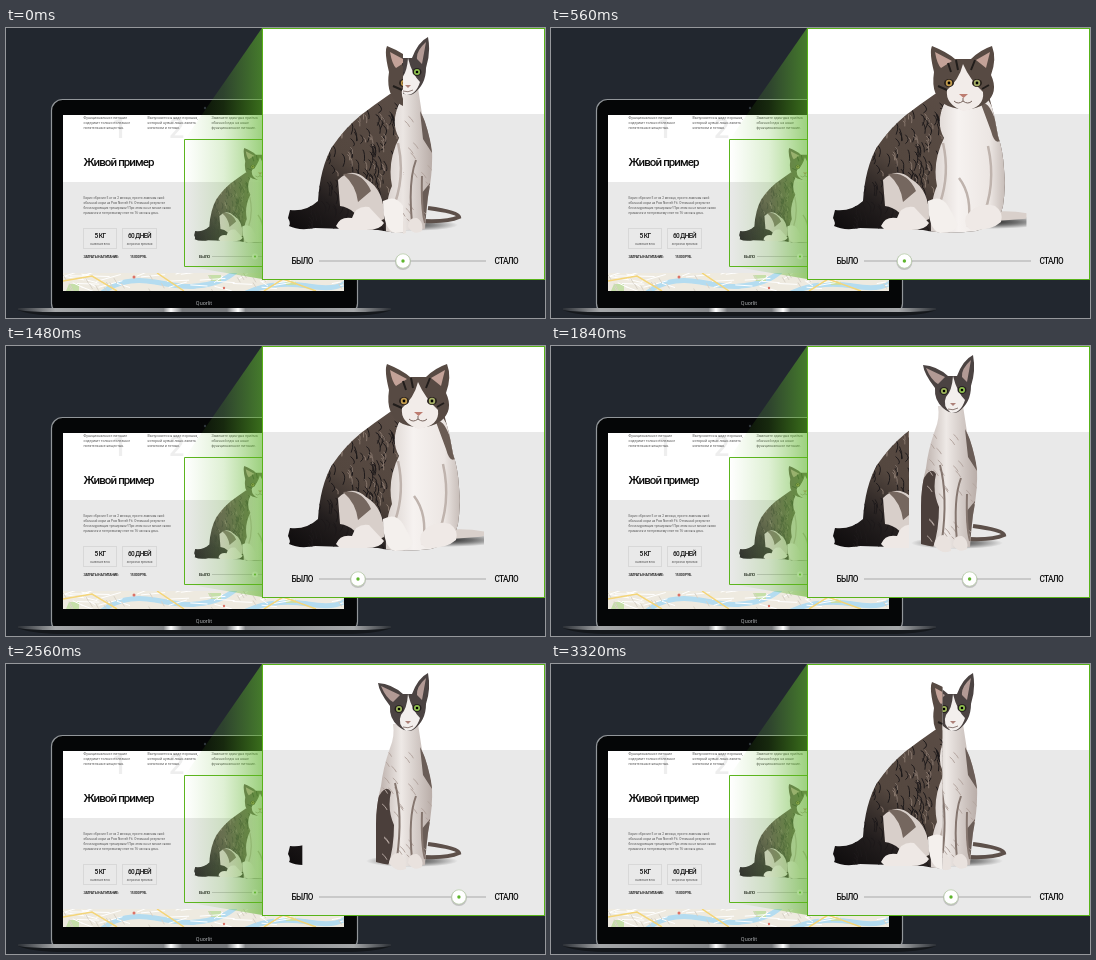
An HTML page for the animation above (3.36 s loop, 539x290 px).

```html
<!DOCTYPE html>
<html lang="ru">
<head>
<meta charset="utf-8">
<style>
  html, body { margin: 0; width: 100%; height: 100%; overflow: hidden; background: #22272f; }
  svg { display: block; width: 539px; height: 290px; }
  text { font-family: Roboto, "Liberation Sans", sans-serif; fill: #111; }
  .bold { font-weight: 500; letter-spacing: -.08em; }
  .tiny { fill: #555; }
</style>
</head>
<body>
<svg viewBox="0 0 539 290">
  <defs>
    <linearGradient id="beam"><stop offset="0" stop-color="#5fb52b" stop-opacity="0"/><stop offset=".5" stop-color="#5fb52b" stop-opacity=".2"/><stop offset="1" stop-color="#5cb22a" stop-opacity=".6"/></linearGradient>
    <linearGradient id="metal"><stop offset="0" stop-color="#2c3036"/><stop offset=".1" stop-color="#a5a7a9"/><stop offset=".39" stop-color="#85878a"/><stop offset=".41" stop-color="#fff"/><stop offset=".44" stop-color="#77797c"/><stop offset=".56" stop-color="#77797c"/><stop offset=".59" stop-color="#fff"/><stop offset=".61" stop-color="#85878a"/><stop offset=".9" stop-color="#a5a7a9"/><stop offset="1" stop-color="#2c3036"/></linearGradient>
    <linearGradient id="coat" x1="0" x2=".8" y1="1" y2="0"><stop offset="0" stop-color="#0c0a0b"/><stop offset=".25" stop-color="#231e1e"/><stop offset=".5" stop-color="#54473f"/><stop offset="1" stop-color="#5b4d46"/></linearGradient>
    <linearGradient id="bib"><stop offset="0" stop-color="#d9d1cd"/><stop offset=".35" stop-color="#f6f2f0"/><stop offset=".75" stop-color="#ece6e3"/><stop offset="1" stop-color="#bdb2ad"/></linearGradient>
    <linearGradient id="skin"><stop offset="0" stop-color="#b5a8a3"/><stop offset=".45" stop-color="#eee9e6"/><stop offset="1" stop-color="#b9ada8"/></linearGradient>
    <radialGradient id="shade"><stop offset="0" stop-color="#000" stop-opacity=".9"/><stop offset=".5" stop-color="#111" stop-opacity=".55"/><stop offset="1" stop-color="#111" stop-opacity="0"/></radialGradient>
    <path id="fatBody" d="M384 66Q368 77 355 87Q339 100 326 119Q314 140 312 173Q300 184 284 182L282 190Q285 195 283 198Q293 203 309 200L372 202Q395 207 425 203Q448 197 452 178Q455 158 453 141Q452 122 447 108Q444 88 438 68Z"/>
    <path id="slimBody" d="M387 60Q389 72 384 84Q377 104 375 122Q370 141 370 160V198Q391 204 419 201Q420 184 422 169Q427 143 426 122Q422 100 416 86L412 60Z"/>
    <clipPath id="fatFur"><use href="#fatBody"/></clipPath>
    <clipPath id="slimFur"><use href="#slimBody"/></clipPath>
    <clipPath id="before"><rect id="beforeBox" x="257" y="1" height="250"/></clipPath>
    <clipPath id="after"><rect id="afterBox" y="1" height="250"/></clipPath>
    <clipPath id="thumb"><rect x="179" y="111" width="77" height="127"/></clipPath>
    <clipPath id="mapArea"><rect x="57" y="245" width="281" height="18"/></clipPath>

    <g id="fat">
      <ellipse cx="435" cy="194" rx="64" ry="7" fill="url(#shade)"/>
      <path d="M438 184Q462 182 480 186Q481 190 472 191L430 194Z" fill="#d9d0cb"/>
      <use href="#fatBody" fill="url(#coat)"/>
      <g clip-path="url(#fatFur)">
        <g id="stripes"/>
        <path d="M394 74Q384 94 393 110Q381 134 386 158Q379 172 380 205H458V108L436 70Z" fill="url(#bib)"/>
        <path d="M430 76Q440 70 450 112Q444 118 440 103Z" fill="#6a5c54"/>
        <path d="M392 115Q399 146 389 175M437 118Q446 158 430 193M408 150Q422 168 417 199" fill="none" stroke="#bfb3ad" stroke-width="2.500"/>
        <path d="M332 152Q346 138 360 151Q379 162 378 191L358 200Q350 180 334 178Z" fill="#d8cfca"/>
        <path d="M337 146Q356 143 365 163L352 174Q350 157 337 146Z" fill="#75675f"/>
      </g>
      <path d="M330 198Q334 188 346 190Q350 177 363 179L378 195Q374 203 356 202L334 202Z" fill="#eee8e5"/>
      <path d="M377 173Q390 166 397 178L407 196Q405 205 389 205Q377 202 377 173Z" fill="#f4f0ed"/>
      <path d="M415 188Q427 173 444 178Q453 184 450 194Q440 203 420 202Q412 198 415 188Z" fill="#efe9e6"/>
      <path d="M383 44Q378 24 381 18Q396 24 404 31H420Q429 22 441 18Q446 31 440 47Q448 64 435 75Q419 86 397 78Q379 70 383 44Z" fill="#574a43"/>
      <path d="M384 24Q386 36 390 40L401 33ZM439 24L425 32L435 40Z" fill="#c3a298"/>
      <path d="M412 36Q408 52 396 62Q394 76 412 83Q434 80 432 64Q419 52 412 36Z" fill="#f2ece9"/>
      <path d="M397 35L400 44M405 32L407 42M424 32L420 42M387 58L396 62M438 57L431 61" stroke="#211d1b" stroke-width="2"/>
      <ellipse cx="398" cy="55" rx="5" ry="4" fill="#28211c"/><ellipse cx="426" cy="55" rx="5" ry="4" fill="#28211c"/>
      <circle cx="398" cy="55" r="3.200" fill="#c29b4d"/><circle cx="426" cy="55" r="3.200" fill="#a5ae66"/>
      <circle cx="398" cy="55" r="1.400"/><circle cx="426" cy="55" r="1.400"/>
      <path d="M408 66H417L412.500 70Z" fill="#bd7c70"/>
      <path d="M412 70V73Q407 77 403 73M412 73Q417 77 421 73" fill="none" stroke="#76635c"/>
    </g>

    <g id="slim">
      <ellipse cx="406" cy="197" rx="46" ry="6" fill="url(#shade)" opacity=".8"/>
      <path d="M422 180Q452 184 453 189Q442 194 418 193" fill="none" stroke="#5d504a" stroke-width="4"/>
      <use href="#slimBody" fill="url(#skin)"/>
      <g clip-path="url(#slimFur)">
        <path d="M366 147Q378 116 385 128Q381 145 388 161Q388 184 382 202H367Z" fill="#4b3f3b"/>
        <path d="M414 83Q424 99 426 125L417 111ZM415 166L424 155V197Q416 191 415 166Z" fill="#6a5d57"/>
        <g id="wrinkles"/>
        <path d="M389 119Q397 150 391 194M410 132Q402 153 406 195M416 148Q415 181 419 195" fill="none" stroke="#85766f" stroke-width="2"/>
      </g>
      <path d="M383 199Q385 189 392 189Q400 191 400 205Q390 209 383 199ZM402 199Q402 189 411 190Q418 194 416 203Q408 208 402 199Z" fill="#e9e2de"/>
      <path d="M384 42Q373 28 372 19Q386 20 397 30H406Q412 14 422 9Q425 25 420 40Q420 57 407 66Q400 69 392 62Q383 54 384 42Z" fill="#4b4342"/>
      <path d="M375 22Q380 34 387 38L394 31ZM420 14Q410 23 411 31L416 36Z" fill="#b29a95"/>
      <path d="M402 30Q401 45 395 51Q391 60 400 67Q410 67 414 54Q406 46 402 30Z" fill="#f3efed"/>
      <ellipse cx="393" cy="45" rx="4.500" ry="4" fill="#25201f"/><ellipse cx="411" cy="44" rx="4.500" ry="4" fill="#25201f"/>
      <circle cx="393" cy="45" r="3" fill="#9eb55b"/><circle cx="411" cy="44" r="3" fill="#8fc04f"/>
      <circle cx="393" cy="45" r="1.300"/><circle cx="411" cy="44" r="1.300"/>
      <path d="M399 57H405L402 60Z" fill="#ad8179"/>
      <path d="M397 63Q402 65 407 62" fill="none" stroke="#8f7d78"/>
    </g>
  </defs>

  <rect width="539" height="290" fill="#22272f"/>

  <!-- laptop -->
  <rect x="45.5" y="71.5" width="306" height="215" rx="11" fill="#050607" stroke="#92969a" stroke-width="1.2"/>
  <circle cx="199" cy="80" r="1.2" fill="#2f353b"/>
  <rect x="57" y="87" width="281" height="176" fill="#fff"/>
  <rect x="57" y="154" width="281" height="91" fill="#e9e9e9"/>
  <g font-size="27" class="bold"><text x="106" y="110" style="fill:#eee">1</text><text x="163" y="110" style="fill:#eee">2</text></g>
  <g id="copy"></g>
  <text class="bold" x="77.5" y="138" font-size="11.5">Живой пример</text>
  <g fill="none" stroke="#d8d8d8"><rect x="77.5" y="200.5" width="33" height="20"/><rect x="116.5" y="200.5" width="34" height="20"/></g>
  <g class="bold" font-size="6.5" text-anchor="middle"><text x="94" y="209.5">5 КГ</text><text x="133.5" y="209.5">60 ДНЕЙ</text></g>
  <g text-anchor="middle" font-size="2.8"><text class="tiny" x="94" y="217">снижение веса</text><text class="tiny" x="133.5" y="217">затрачено времени</text></g>
  <g class="bold" font-size="3.6"><text x="77.5" y="229.5">ЗАТРАТЫ НА ПИТАНИЕ:</text><text x="124" y="229.5">15 000 РУБ.</text></g>
  <g clip-path="url(#mapArea)">
    <rect x="57" y="245" width="281" height="18" fill="#eeeae0"/>
    <path d="M96 265Q117 248 149 254T190 258Q217 256 231 242M238 266Q267 252 302 258T344 249" fill="none" stroke="#b4dcf0" stroke-width="5"/>
    <path d="M63 256h10v7H60ZM202 247h13v6h-10ZM279 253h11v4h-10Z" fill="#c6dfa9"/>
    <g id="streets"></g>
    <path d="M57 253L86 248L111 263M151 245L178 263M258 263L277 251L310 263" fill="none" stroke="#f4d578" stroke-width="1.5"/>
    <circle cx="128" cy="249" r="1.5" fill="#dc7266"/><circle cx="218" cy="260" r="1.2" fill="#dc7266"/>
  </g>
  <path d="M12 280H385V282Q374 287 345 288H52Q23 287 12 282Z" fill="#15181c"/>
  <path d="M12 280H385V282Q370 284 349 284H48Q25 284 12 282Z" fill="url(#metal)"/>
  <text x="198" y="277" font-size="5.5" text-anchor="middle" style="fill:#a8aaad">Quorlit</text>

  <!-- selected area and its enlargement -->
  <g clip-path="url(#thumb)"><use href="#fat" transform="translate(175 111) scale(.506) translate(-256 0)" opacity=".85"/></g>
  <text class="bold" x="193" y="230" font-size="4.2">БЫЛО</text>
  <path d="M206 228.5H256" stroke="#c3c3c3"/><circle cx="249" cy="228.5" r="3" fill="#fff"/><circle cx="249" cy="228.5" r="1" fill="#5eb52b"/>
  <path d="M179 111L256 0V251L179 238Z" fill="url(#beam)"/>
  <path d="M256 111.500H178.500V238.500H256" fill="none" stroke="#5cb51e"/>
  <rect x="256" width="283" height="252" fill="#fff"/>
  <rect x="256" y="86" width="283" height="166" fill="#e9e9e9"/>
  <g clip-path="url(#before)"><use href="#fat"/></g>
  <g clip-path="url(#after)"><use href="#slim"/></g>
  <rect x="256.5" y=".5" width="282" height="251" fill="none" stroke="#58b319"/>
  <path d="M313 233H480" stroke="#c9c9c9" stroke-width="2"/>
  <g class="bold" font-size="8.2"><text x="285.5" y="236">БЫЛО</text><text x="488.5" y="236">СТАЛО</text></g>
  <g id="knob">
    <circle cy="1" r="8" fill="#777" opacity=".35"/>
    <circle r="7.2" fill="#fff" stroke="#b9cfaa" stroke-width=".8"/>
    <circle r="1.7" fill="#5eb52b"/>
  </g>
</svg>
<script>
const LOOP = 3360, STEP = 40, MIDDLE = 397;
const byId = id => document.getElementById(id);

function random(seed) {
  return () => (seed = seed * 16807 % 2147483647) / 2147483647;
}

function strokes(id, count, seed, color, draw) {
  const next = random(seed);
  const d = Array.from({ length: count }, () => draw(next)).join('');
  byId(id).innerHTML += `<path d="${d}" fill="none" stroke="${color}"/>`;
}

const fur = next => {
  const x = 300 + next() * 110, y = 75 + next() * 125;
  return `M${x} ${y}q${2 + next() * 5} ${2 + next() * 4} ${next() * 3} ${7 + next() * 7}`;
};
strokes('stripes', 190, 31, '#1d191a', fur);
strokes('stripes', 60, 97, '#86766c', next => {
  const x = 330 + next() * 75, y = 78 + next() * 85;
  return `M${x} ${y}q3 2 2 ${4 + next() * 6}`;
});
strokes('wrinkles', 32, 53, '#b3a59f', next =>
  `M${376 + next() * 50} ${78 + next() * 115}q3 2 5 6`);
strokes('streets', 38, 17, '#fff', next => {
  const x = 55 + next() * 280, y = 244 + next() * 16;
  return `M${x} ${y}l${8 + next() * 18} ${next() * 14 - 7}`;
});
strokes('streets', 25, 77, '#d8d2c7', next =>
  `M${57 + next() * 280} ${245 + next() * 16}l3 5`);

function paragraph(x, y, size, lines) {
  byId('copy').innerHTML += lines.map((line, i) =>
    `<text class="tiny" font-size="${size}" x="${x}" y="${y + i * 4.85}">${line}</text>`).join('');
}
paragraph(77.5, 91, 3.6, ['Функциональное питание', 'содержит только полезные', 'питательные вещества.']);
paragraph(141.5, 91, 3.6, ['Выпускается в виде порошка,', 'который нужно лишь залить', 'кипятком и готово.']);
paragraph(205.5, 91, 3.6, ['Замените один-два приёма', 'обычной еды на наше', 'функциональное питание.']);
paragraph(77.5, 171, 3.2, [
  'Борис сбросил 5 кг за 2 месяца, просто заменив свой',
  'обычный корм на Paw Norvelt Fit. Отличный результат',
  'без изнуряющих тренировок! При этом он не менял своих',
  'привычек и по-прежнему спит по 16 часов в день.'
]);

// Time and position of the slider handle
const keys = [[0, MIDDLE], [280, 388], [880, 320], [1120, 320], [1480, 352],
  [2240, 472], [2800, 432], [3320, 400], [LOOP, MIDDLE]];
const slope = i => (keys[i + 1][1] - keys[i][1]) / (keys[i + 1][0] - keys[i][0]);
const tangent = i => {
  const last = keys.length - 1;
  const a = slope(i > 0 ? i - 1 : last - 1), b = slope(i < last ? i : 0);
  return a * b > 0 ? 2 * a * b / (a + b) : 0;
};

function handleAt(t) {
  const i = keys.findIndex((key, n) => t < keys[n + 1][0]);
  const [t0, x0] = keys[i], [t1, x1] = keys[i + 1];
  const h = t1 - t0, p = (t - t0) / h, q = 1 - p;
  return x0 * (1 + 2 * p) * q * q + x1 * p * p * (3 - 2 * p)
    + h * p * q * (q * tangent(i) - p * tangent(i + 1));
}

function render(t) {
  const x = handleAt(t);
  const split = MIDDLE - (x - MIDDLE) * 1.8;
  byId('knob').setAttribute('transform', `translate(${x} 233)`);
  byId('beforeBox').setAttribute('width', split - 257);
  byId('afterBox').setAttribute('x', split);
  byId('afterBox').setAttribute('width', 538 - split);
}

const start = performance.now();
function tick() {
  const t = (performance.now() - start) % LOOP;
  render(Math.floor(t / STEP) * STEP);
  requestAnimationFrame(tick);
}
tick();
</script>
</body>
</html>
```
